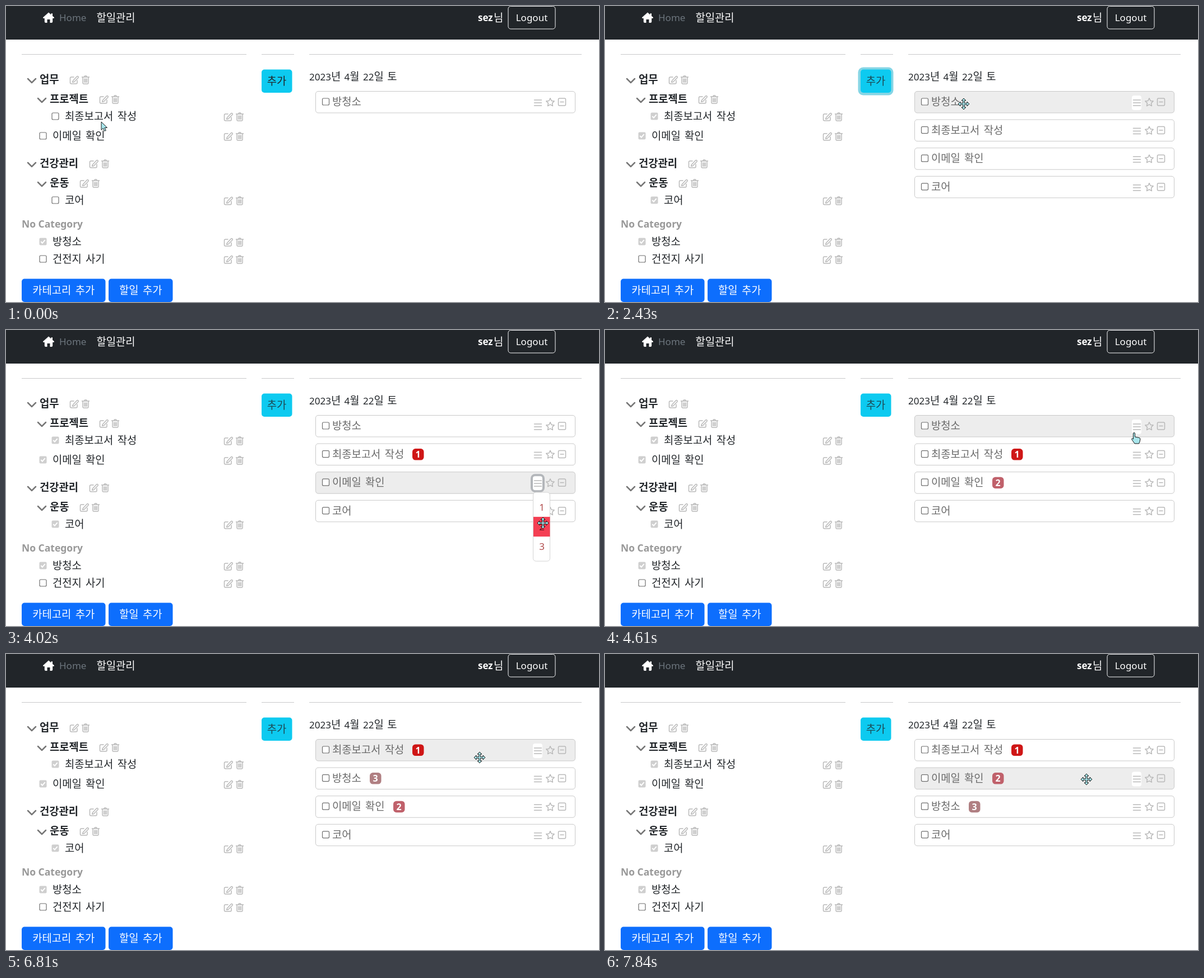
An HTML page for the animation above (8000 ms loop, 1058x529 px).

```html
<!DOCTYPE html>
<html lang="ko">
<head>
<meta charset="utf-8">
<title>할일관리</title>
<style>
  html, body { margin: 0; width: 100%; height: 100%; overflow: hidden; background: #fff; }
  svg { display: block; width: 1058px; height: 529px; }
  text { font: 17px "Noto Sans", "Open Sans", sans-serif; fill: #212529; white-space: pre; }
  .ko { font: 350 18.8px "Noto Sans CJK KR", "Noto Sans CJK", sans-serif; word-spacing: 2px; }
  .b { font-weight: 700; }
  .mid { text-anchor: middle; }
  .w { fill: #fff; }
  .task { fill: #6a6a6a; }
  .icon { fill: none; stroke: #b9b9b9; stroke-width: 1.5; stroke-linejoin: round; stroke-linecap: round; }
  .chev { fill: none; stroke: #777; stroke-width: 2.5; stroke-linecap: round; stroke-linejoin: round; }
  .cursor { fill: #a9e6ec; stroke: #000; stroke-width: .9; stroke-linejoin: round; }
</style>
</head>
<body>
<svg viewBox="0 0 1058 529">
  <g id="page"></g>
  <g id="live"></g>
</svg>
<script>
const LOOP = 8000, TICK = 200;
const ROW_TOP = 152, ROW_STEP = 50.6, ROW_H = 39;
const TASKS = ['방청소', '최종보고서 작성', '이메일 확인', '코어'];
const BADGE_X = [659, 735, 701];
const RANKS = [3, 1, 2], RANKED_AT = [27, 16, 21];
const RANK_FILL = ['', '#cf1616', '#c0616b', '#b07f82'];

// Pointer path: [tick, x, y]
const PATH = [
  [0, 170, 207], [2, 168, 207], [4, 156, 226], [6, 141, 338], [7, 141, 340], [8, 300, 250],
  [9, 474, 138], [11, 474, 138], [12, 640, 175], [13, 944, 216], [14, 944, 218], [15, 959, 282],
  [16, 959, 280], [17, 946, 268], [19, 944, 268], [20, 958, 345], [21, 958, 345], [22, 944, 230],
  [23, 944, 184], [24, 944, 184], [25, 957, 240], [26, 957, 290], [27, 957, 290], [28, 900, 255],
  [30, 848, 237], [31, 848, 237], [33, 845, 186], [34, 845, 185], [35, 848, 248], [36, 856, 268],
  [37, 858, 262], [38, 859, 228], [39, 859, 224]
];

const SHAPES = {
  edit: 'M-1-5H-5.5a2 2 0 0 0-2 2V5a2 2 0 0 0 2 2H3a2 2 0 0 0 2-2V1M-2.5 1.5L4.5-6a1.4 1.4 0 0 1 2.3 2.3L-.5 3.7-3.3 4.3z',
  trash: 'M-6.5-5H6.5M-2.5-5L-1.5-7H1.5L2.5-5M-5-5V5.5a1.7 1.7 0 0 0 1.7 1.7H3.3A1.7 1.7 0 0 0 5 5.5V-5M-2.3-2V4.5M0-2V4.5M2.3-2V4.5',
  star: 'M0-7.2L2.2-2.6 7.2-2 3.5 1.6 4.4 6.6 0 4.2-4.4 6.6-3.5 1.6-7.2-2-2.2-2.6z',
  minus: 'M-4.5-6.5h9a2 2 0 0 1 2 2v9a2 2 0 0 1-2 2h-9a2 2 0 0 1-2-2v-9a2 2 0 0 1 2-2zM-3 0H3',
  bars: 'M-6.5-5H6.5M-6.5 0H6.5M-6.5 5H6.5',
  chev: 'M-7-3L0 4 7-3',
  arrow: 'M0 0V14.5L3.4 11.4 5.8 16.5 8.3 15.3 6 10.5H10.5Z',
  hand: 'M-1.5 1a1.5 1.5 0 0 1 3 0V7l7.5 1.5q2 .5 2 2.5l-1 5-1.5 3H1L-4 12q-1-2 .5-2.5L-1.5 11z',
  move: 'M0-10L4-6H1.3V-1.3H6V-4L10 0 6 4V1.3H1.3V6H4L0 10-4 6H-1.3V1.3H-6V4L-10 0-6-4V-1.3H-1.3V-6H-4Z'
};

const shape = (name, x, y, cls = 'icon') =>
  `<path class="${cls}" transform="translate(${x} ${y})" d="${SHAPES[name]}"/>`;
const rect = (x, y, w, h, r, fill, more = '') =>
  `<rect x="${x}" y="${y}" width="${w}" height="${h}" rx="${r}" fill="${fill}" ${more}/>`;
const text = (x, y, s, cls = '') => `<text x="${x}" y="${y}" class="${cls}">${s}</text>`;
const ko = (x, midY, s, cls = '') => text(x, midY + 7, s, 'ko ' + cls);
const tools = (x, y) => shape('edit', x, y) + shape('trash', x + 20, y);

function box(x, y, fill) {
  if (!fill) return rect(x - 6, y - 6, 12, 12, 2, '#fff', 'stroke="#6f6f6f" stroke-width="1.2"');
  return rect(x - 6.5, y - 6.5, 13, 13, 2, fill) +
    `<path d="M${x - 3.7} ${y}l2.6 2.8 4.8-5.6" fill="none" stroke="#fff" stroke-width="2"/>`;
}

function drawPage() {
  const rule = (a, b) => `<path d="M${a} 86.5H${b}" stroke="#c8c9ca"/>`;
  const category = (x, y, s, toolX) =>
    shape('chev', x, y + 2, 'chev') + ko(x + 14, y, s, 'b') + tools(toolX, y + 1);
  const item = (x, y, s) => ko(x, y, s) + tools(397, y + 1);
  const button = (x, w, s) =>
    rect(x, 487.5, w, 41.5, 5, '#0d6efd') + ko(x + w / 2, 508, s, 'w mid');
  const date = '2023년 4월 22일 토'.replace(/[가-힣]/g, '<tspan class="ko">$&</tspan>');
  return rect(0, 0, 1058, 60, 0, '#212529') +
    '<path fill="#fff" d="M76 11.5L66 20.5q0 1.5 1.3 1.5h1.5v6q0 2 2 2h2.7v-6h5v6h2.7q2 0 2-2v-6h1.5q1.3 0 1.3-1.5l-3-2.7v-4.5h-2.5v2.2z"/>' +
    '<text x="95" y="27" style="fill:#6c757d">Home</text>' +
    ko(161.5, 20.7, '할일관리', 'w') + text(842, 27, 'sez', 'b w') + ko(870, 20.7, '님', 'w') +
    rect(896, .5, 84, 40.5, 4.5, 'none', 'stroke="#f8f9fa"') + text(938, 27, 'Logout', 'w mid') +
    rule(28, 429) + rule(456, 514) + rule(541, 1027) +
    category(46, 131, '업무', 122) + category(64, 166, '프로젝트', 175) +
    category(46, 281, '건강관리', 157) + category(64, 316, '운동', 140) +
    item(105, 197, '최종보고서 작성') + item(83, 232, '이메일 확인') + item(105, 347, '코어') +
    item(83, 421, '방청소') + item(83, 452, '건전지 사기') +
    '<text x="28" y="396" class="b" style="font-size:17.5px;fill:#999">No Category</text>' +
    box(66, 421, '#cfcfcf') + box(66, 452) +
    button(28, 149.5, '카테고리 추가') + button(183, 114.5, '할일 추가') +
    `<text x="541" y="133" style="word-spacing:2px">${date}</text>`;
}

function pointerAt(tick) {
  const i = PATH.findLastIndex(p => p[0] <= tick);
  const [t, x, y] = PATH[i], next = PATH[i + 1];
  if (!next) return [x, y];
  const k = (tick - t) / (next[0] - t);
  return [x + (next[1] - x) * k, y + (next[2] - y) * k];
}

function openMenu(tick) {
  const inside = (a, b) => tick >= a && tick < b;
  return inside(14, 16) ? 1 : inside(19, 21) ? 2 : inside(24, 27) ? 0 : -1;
}

function drawRow(task, slot, tick, hovered, opened) {
  const y = ROW_TOP + slot * ROW_STEP, mid = y + 19;
  let out = rect(552.5, y + .5, 463, ROW_H - .5, 4.5, hovered ? '#ededed' : '#fff', 'stroke="#c9c9c9"') +
    box(570.5, mid) + ko(582, mid, TASKS[task], 'task');
  if (tick >= RANKED_AT[task]) {
    const x = BADGE_X[task], rank = RANKS[task];
    out += rect(x - 10, mid - 9.5, 20.5, 20.5, 5.5, RANK_FILL[rank]) +
      `<text x="${x}" y="${mid + 6.5}" class="b w mid" style="font-size:16px">${rank}</text>`;
  }
  if (opened) out += rect(938, y + 6, 21, 29, 6, '#fff', 'stroke="#b3b6ba" stroke-width="4"');
  else if (hovered) out += rect(940, y + 8, 17, 26, 4, '#fff');
  return out + shape('bars', 949, mid + 2) +
    shape('star', 971, mid + 1) + shape('minus', 992, mid + .5);
}

function drawMenu(slot, y) {
  const top = 239 + (slot - 1) * ROW_STEP, step = 35.3;
  const picked = Math.floor((y - top - 9) / step);
  let out = rect(940.5, top + .5, 30, 123, 5, '#fff', 'stroke="#d4d4d4"');
  for (let i = 0; i < 3; i++) {
    const itemY = top + 9 + i * step, on = i === picked;
    if (on) out += rect(941, itemY, 29.5, step, 0, '#f43f53');
    out += `<text x="956" y="${itemY + 24}" class="mid" style="fill:${on ? '#6b1620' : '#b04a4a'}">${i + 1}</text>`;
  }
  return out;
}

function drawLive(tick) {
  const [x, y] = pointerAt(tick), added = tick >= 10, menu = openMenu(tick);
  const order = !added ? [0] : tick < 33 ? [0, 1, 2, 3] : tick < 38 ? [1, 0, 2, 3] : [1, 2, 0, 3];
  const inList = x > 552 && y > ROW_TOP && y < ROW_TOP + order.length * ROW_STEP;
  const at = Math.floor((y - ROW_TOP) / ROW_STEP);
  const onRow = inList && y - ROW_TOP - at * ROW_STEP <= ROW_H + .5;
  const hover = menu >= 0 ? menu : onRow ? at : -1;

  // Checkbox: [x, y, tick checked, tick the pointer leaves]
  const checks = [[88, 197, 1, 3], [66, 232, 4, 5], [88, 347, 6, 8]];
  let out = checks.map(([bx, by, from, leave]) =>
    box(bx, by, added ? '#cfcfcf' : tick < from ? '' : tick < leave ? '#3c6b3e' : '#4f944f')).join('');

  if (added && tick < 14) out += rect(451.5, 109.5, 63, 50, 9, '#85d5e5');
  out += rect(456, 113.5, 54.5, 41.5, 5, '#0dcaf0') +
    `<g opacity="${added ? .78 : 1}">${ko(483, 134, '추가', 'mid')}</g>`;
  out += order.map((task, slot) => drawRow(task, slot, tick, slot === hover, slot === menu)).join('');
  if (menu >= 0) out += drawMenu(menu, y);

  const onButton = x > 456 && x < 510 && y > 114 && y < 155;
  const onBars = onRow && x > 938 && x < 950;
  const kind = onButton || onBars ? 'hand' : inList || menu >= 0 ? 'move' : 'arrow';
  return out + shape(kind, x, y, 'cursor');
}

const live = document.getElementById('live');
document.getElementById('page').innerHTML = drawPage();
const start = performance.now();
let shown = -1;
function frame() {
  const tick = Math.floor((performance.now() - start) % LOOP / TICK);
  if (tick !== shown) live.innerHTML = drawLive(shown = tick);
  requestAnimationFrame(frame);
}
frame();
</script>
</body>
</html>
```
